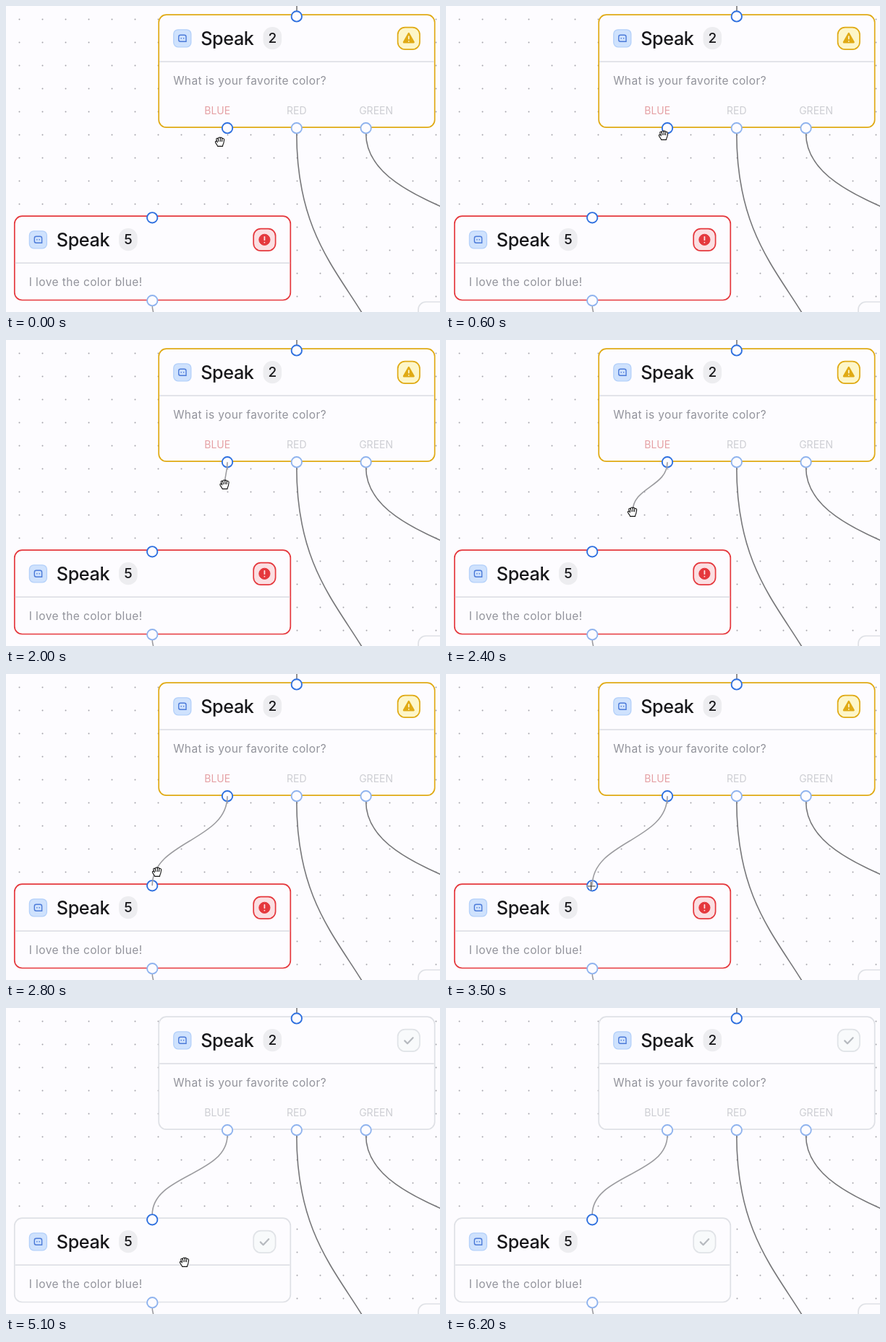
Animation of 600 by 424 pixels, one loop 6.3 s. Source, as an HTML page:

```html
<!DOCTYPE html>
<html lang="en">
<head>
<meta charset="utf-8">
<title>Flow editor</title>
<style>
  html, body { margin: 0; height: 100%; overflow: hidden; background: #fdfcff; }
  svg { display: block; font-family: Inter, sans-serif; }
  .edge { fill: none; stroke: #77777a; stroke-width: 1.6; }
  .light { stroke: #9c9ca0; }
  .box { fill: #fdfcff; stroke: #dfe1e6; stroke-width: 1.7; }
  .rule { stroke: #dfe1e6; stroke-width: 1.7; }
  .title { font-size: 25.2px; font-weight: 500; letter-spacing: -.4px; fill: #18181b; }
  .count { font-size: 19px; font-weight: 500; fill: #18181b; text-anchor: middle; }
  .body { font-size: 15.5px; letter-spacing: .4px; fill: #92939b; }
  .port { font-size: 14px; fill: #cdced3; text-anchor: middle; }
  .handle { fill: #fdfcff; stroke: #2f70df; stroke-width: 1.9; }
  .used { stroke: #8fb3ee; }
  .badge { fill: #f8fafb; stroke: #e0e3e7; stroke-width: 1.7; }
  .tick { fill: none; stroke: #b6babf; stroke-width: 2.2; stroke-linecap: round; stroke-linejoin: round; }
  .warn { --c: #e0aa14; --tint: #fdf6c8; }
  .error { --c: #e5383d; --tint: #fbdfe2; }
  .open .box, .open .badge { stroke: var(--c); }
  .open .badge { fill: var(--tint); }
  .open .tick, .alert { display: none; }
  .open .alert { display: inline; fill: var(--c); stroke: var(--c); stroke-linejoin: round; }
  .alert .mark { fill: none; stroke: var(--tint); stroke-width: 1.8; stroke-linecap: round; }
  .open .missing { fill: #e5a0a4; }
  .open .pending { stroke: #2f70df; }
  .open .card-plain { stroke: #dfe1e6; }
</style>
</head>
<body>
<svg id="stage" width="600" height="424" viewBox="0 0 600 424">
  <defs>
    <pattern id="dots" width="32" height="32" patternUnits="userSpaceOnUse">
      <circle cx="18.5" cy="18.5" r="1" fill="#a3a3a9"/>
    </pattern>
  </defs>
  <rect width="600" height="424" fill="#fdfcff"/>
  <rect width="600" height="424" fill="url(#dots)"/>
  <g id="edges"></g>
  <path id="link" class="edge light"/>
  <g id="cards"></g>
  <g id="handles"></g>
  <path id="drag" class="edge light"/>
  <g id="cursor">
    <g id="hand" fill="#fff" stroke="#111" stroke-width="1.1" stroke-linejoin="round" stroke-linecap="round">
      <path d="M-3.4 6.4C-4 4.4-5.6 3-6.5 1C-6.9-.8-5.4-1.2-4.6-.3L-3.7.8L-5.2-3C-5.5-4.9-3.4-5.3-2.8-4L-2.6-4.8C-2.2-6.4-.2-6.4.2-5C.8-6.4 2.8-6 2.9-4.4C4-5.2 5.8-4.2 5.6-2.6C5.3.6 5 2.8 3.8 4.6L3.5 6.4Z"/>
      <path d="M-2.8-4L-1.9-.4M.2-5L.4-.6M2.9-4.4L2.5-.4" fill="none"/>
    </g>
    <g id="cross" fill="none">
      <path d="M-6 0H6M0-6V6" stroke="#fff" stroke-width="2.4"/>
      <path d="M-6 0H6M0-6V6" stroke="#333" stroke-width="1.1"/>
    </g>
  </g>
</svg>
<script>
const $ = id => document.getElementById(id);
const LOOP = 6300, STEP = 100, GRAB = 1700, DROP = 3600, EXIT = 5600;
const SOURCE = [306, 169.2], TARGET = [202.2, 293.3], RADIUS = 7.2;

const curve = ([x0, y0], [x1, y1]) => {
  const mid = (y0 + y1) / 2;
  return `M${x0} ${y0}C${x0} ${mid} ${x1} ${mid} ${x1} ${y1}`;
};

// Finished edges run from the bottom of one handle to the top of the next
const connect = ([x0, y0], [x1, y1]) => curve([x0, y0 + RADIUS], [x1, y1 - RADIUS]);

const alerts = {
  warn: '<path d="M345.6 25.8L352.4 38H338.8Z" stroke-width="2.4"/><path class="mark" d="M345.6 30V33.4M345.6 36.6V36.7"/>',
  error: '<circle cx="345.6" cy="32.6" r="7.6"/><path class="mark" d="M345.6 28.6V33M345.6 36.4V36.5"/>'
};

const card = (x, y, height, kind, count, text) => `
  <g class="${kind}" transform="translate(${x} ${y})">
    <rect class="box" width="381.5" height="${height}" rx="10.5"/>
    <path class="rule" d="M1 65H380.5"/>
    <rect x="20.6" y="20.6" width="24" height="24" rx="6" fill="#cfe2fd" stroke="#b3d0fa" stroke-width="1.3"/>
    <path d="M30 28H35.3Q37.8 28 37.8 30.5V37H30Q27.5 37 27.5 34.5V30.5Q27.5 28 30 28Z" fill="none" stroke="#4c7bd9" stroke-width="1.4"/>
    <path d="M31 31.8V33.4M34.4 31.8V33.4" stroke="#4c7bd9" stroke-width="1.3"/>
    <text class="title" x="58" y="42">Speak</text>
    <rect x="144.3" y="16.8" width="25.6" height="31.2" rx="12.5" fill="#ededf0"/>
    <text class="count" x="157.1" y="39.3">${count}</text>
    <rect class="badge" x="330.4" y="17.5" width="30.4" height="30.4" rx="10"/>
    <path class="tick" d="M340 33.2L343.8 37L351.4 29"/>
    <g class="alert">${alerts[kind]}</g>
    <text class="body" x="20" y="96.4">${text}</text>
  </g>`;

$('edges').innerHTML = [
  connect([401.8, 169.2], [547, 626]),
  connect([497.6, 169.2], [760, 411]),
  'M402 0V14'
].map(d => `<path class="edge" d="${d}"/>`).join('') +
  '<path class="edge light" d="M202.2 415Q202.2 420 204.5 427"/>';

$('cards').innerHTML =
  card(211.2, 12.2, 156, 'warn', 2, 'What is your favorite color?') +
  card(11.8, 291.2, 116.3, 'error', 5, 'I love the color blue!') +
  '<rect class="box card-plain" x="570" y="410" width="382" height="116" rx="10.5"/>' +
  [['BLUE', 292.2, 'missing'], ['RED', 401.8, ''], ['GREEN', 511.6, '']]
    .map(([name, x, state]) => `<text class="port ${state}" x="${x}" y="150.4">${name}</text>`).join('');

$('handles').innerHTML = [
  [401.8, 14.4, ''], [...SOURCE, 'used pending'], [401.8, 169.2, 'used'],
  [497.6, 169.2, 'used'], [...TARGET, ''], [202.3, 408.2, 'used']
].map(([x, y, state]) => `<circle class="handle ${state}" cx="${x}" cy="${y}" r="${RADIUS}"/>`).join('');

$('link').setAttribute('d', connect(SOURCE, TARGET));

// Pointer track: time, x, y
const track = [
  [0, 296, 188], [300, 296, 188], [900, 306, 170], [GRAB, 306, 170],
  [2000, 302.5, 200], [2400, 258, 238], [2800, 209, 274], [3200, 200.6, 294],
  [4500, 200.6, 294], [5100, 247, 352], [EXIT, 282, 436]
];

const slope = (i, axis) => {
  const a = track[i - 1], b = track[i], c = track[i + 1];
  if (!a || !c || (b[axis] - a[axis]) * (c[axis] - b[axis]) <= 0) return 0;
  return (c[axis] - a[axis]) / (c[0] - a[0]);
};

// Cubic Hermite that stays flat around pauses
function pointerAt(t) {
  const i = Math.min(track.findLastIndex(k => k[0] <= t), track.length - 2);
  const a = track[i], b = track[i + 1], span = b[0] - a[0];
  const u = Math.min(1, (t - a[0]) / span), v = 1 - u;
  return [1, 2].map(n =>
    a[n] * v * v * (1 + 2 * u) + b[n] * u * u * (3 - 2 * u) +
    span * u * v * (slope(i, n) * v - slope(i + 1, n) * u));
}

const show = (id, on) => $(id).style.display = on ? '' : 'none';
const near = (p, q, r) => Math.hypot(p[0] - q[0], p[1] - q[1]) < r;

function draw(now) {
  const t = Math.floor(now / STEP) * STEP % LOOP;
  const pointer = pointerAt(t);
  const dragging = t > GRAB && t < DROP;
  const over = near(pointer, SOURCE, 8) || near(pointer, TARGET, 8);

  $('stage').classList.toggle('open', t < DROP);
  show('link', t >= DROP);
  show('drag', dragging);
  $('drag').setAttribute('d', curve(SOURCE, near(pointer, TARGET, 30) ? TARGET : pointer));

  show('cursor', t < EXIT);
  $('cursor').setAttribute('transform', `translate(${pointer})`);
  show('hand', !over);
  show('cross', over);
}

function tick() {
  draw(performance.now());
  requestAnimationFrame(tick);
}
tick();
</script>
</body>
</html>
```
